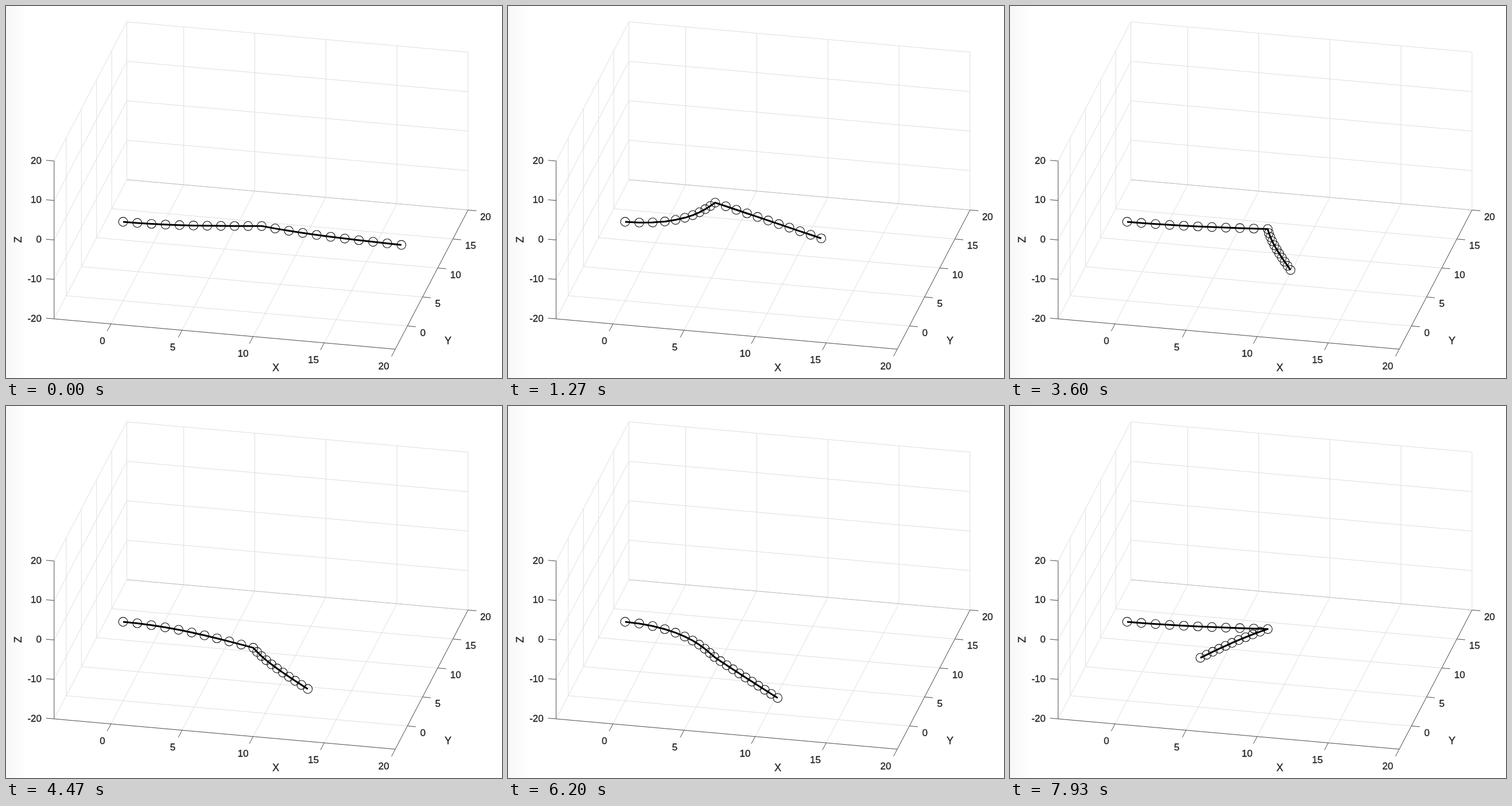
An HTML page for the animation above (8000 ms loop, 864 by 648 pixels).

```html
<!DOCTYPE html>
<html lang="en">
<head>
<meta charset="utf-8">
<title>Two flexible links</title>
<style>
  html, body { margin: 0; width: 100%; height: 100%; overflow: hidden; background: #fff; }
  svg { display: block; width: 864px; height: 648px; }
  path, circle { fill: none; }
  .grid { stroke: #dedede; }
  .edge { stroke: #c4c4c4; }
  .axis { stroke: #4a4a4a; }
  .arm { stroke: #000; stroke-width: 3; stroke-linejoin: round; }
  circle { stroke: #111; stroke-width: 1.1; }
  text {
    font: 17px "Liberation Sans", Arial, sans-serif;
    fill: #222; stroke: #222; stroke-width: 0.35;
    dominant-baseline: central;
  }
  .name { font-size: 18px; text-anchor: middle; }
</style>
</head>
<body>
<svg viewBox="0 0 864 648">
  <defs>
    <linearGradient id="shade">
      <stop offset="0" stop-color="#f7f7f7"/>
      <stop offset="1" stop-color="#fff"/>
    </linearGradient>
  </defs>
  <rect width="36" height="648" fill="url(#shade)"/>
</svg>
<script>
const svg = document.querySelector('svg');

function add(tag, attrs, text = '') {
  const node = document.createElementNS('http://www.w3.org/2000/svg', tag);
  for (const key in attrs) node.setAttribute(key, attrs[key]);
  node.textContent = text;
  svg.append(node);
  return node;
}

const project = (x, y, z) => [
  204 + 24.76 * x + 5.28 * y,
  375.9 + 2.2 * x - 10.1 * y - 6.875 * z
];
const toPath = points => 'M' + points.map(p => p.map(v => v.toFixed(2))).join('L');
const line = (kind, ...points) => add('path', { class: kind, d: toPath(points) });
const label = (text, x, y, anchor) => add('text', { x, y, 'text-anchor': anchor }, text);

const MIN = -4, MAX = 20, FLOOR = -20;

function drawAxes() {
  const at = project;
  const tick = ([x, y], dx, dy) => line('axis', [x, y], [x + dx, y + dy]);

  for (let v = 0; v <= MAX; v += 5) {
    line('grid', at(v, MIN, FLOOR), at(v, MAX, FLOOR), at(v, MAX, 20));
    line('grid', at(MAX, v, FLOOR), at(MIN, v, FLOOR), at(MIN, v, 20));
    tick(at(v, MIN, FLOOR), -6.5, 12.5);
    label(v, 168 + 24.5 * v, 583 + 2.2 * v, 'middle');
    tick(at(MAX, v, FLOOR), 14.5, 1.3);
    label(v, 721.5 + 5.22 * v, 569 - 10.1 * v, 'start');
  }
  for (let z = FLOOR; z <= 20; z += 10) {
    const corner = at(MIN, MIN, z);
    line('grid', corner, at(MIN, MAX, z), at(MAX, MAX, z));
    tick(corner, -14, -1.2);
    label(z, 62, corner[1] - 1, 'end');
  }
  line('edge', at(MIN, MAX, FLOOR), at(MAX, MAX, FLOOR));
  line('axis', at(MIN, MIN, 20), at(MIN, MIN, FLOOR), at(MAX, MIN, FLOOR), at(MAX, MAX, FLOOR));

  add('text', { class: 'name', x: 470, y: 630 }, 'X');
  add('text', { class: 'name', x: 770, y: 583 }, 'Y');
  add('text', { class: 'name', transform: 'translate(21 407) rotate(-90)' }, 'Z');
}

const ramp = (t, from, to) => Math.min(1, Math.max(0, (t - from) / (to - from)));

// The first link is lifted, returns to rest, dives and returns again.
function firstBend(t) {
  const lift = ramp(t, -0.1, 0.85) - ramp(t, 2.65, 3.55);
  const dive = ramp(t, 3.8, 5.05) - ramp(t, 6.8, 7.75);
  return 0.2 + 1.03 * lift - 1.44 * dive;
}

// Second link: key times in seconds, mean direction and bend
const SWING = [
  { t: 0, aim: -0.165, bend: 0.28 },
  { t: 1.27, aim: -0.73, bend: 0 },
  { t: 2.53, aim: -1.05, bend: -0.23 },
  { t: 3.6, aim: -1.41, bend: 0.14 },
  { t: 5.27, aim: -0.96, bend: 0.28 },
  { t: 6.2, aim: -1.11, bend: 0.03 },
  { t: 7.8, aim: -2.065, bend: 0.13 }
];

function secondLink(t) {
  const next = SWING.find(key => key.t > t) ?? SWING.at(-1);
  const last = SWING.findLast(key => key.t <= t);
  const k = next === last ? 0 : ramp(t, last.t, next.t);
  const mix = name => last[name] + (next[name] - last[name]) * k;
  const bend = mix('bend');
  return { start: mix('aim') - bend * 2 / 3, bend };
}

const SEGMENTS = 10;

// Each link has ten unit segments and bends like a cantilever: most at its root.
function armNodes(t) {
  let x = 0, z = 0;
  const nodes = [project(0, 0, 0)];
  for (const { start, bend } of [{ start: 0, bend: firstBend(t) }, secondLink(t)]) {
    for (let i = 0; i < SEGMENTS; i++) {
      const s = (i + 0.5) / SEGMENTS;
      const angle = start + bend * (2 * s - s * s);
      x += Math.cos(angle);
      z += Math.sin(angle);
      nodes.push(project(x, 0, z));
    }
  }
  return nodes;
}

drawAxes();
const rings = Array.from({ length: 2 * SEGMENTS + 1 }, () => add('circle', { r: 7.8 }));
const arm = add('path', { class: 'arm' });

const LOOP = 8, RATE = 15;

function render(seconds) {
  const step = Math.floor((seconds % LOOP + 0.004) * RATE) % (LOOP * RATE);
  const nodes = armNodes(step / RATE);
  arm.setAttribute('d', toPath(nodes));
  nodes.forEach(([x, y], i) => {
    rings[i].setAttribute('cx', x);
    rings[i].setAttribute('cy', y);
  });
}

const begin = performance.now();
function loop() {
  render((performance.now() - begin) / 1000);
  requestAnimationFrame(loop);
}
loop();
</script>
</body>
</html>
```
